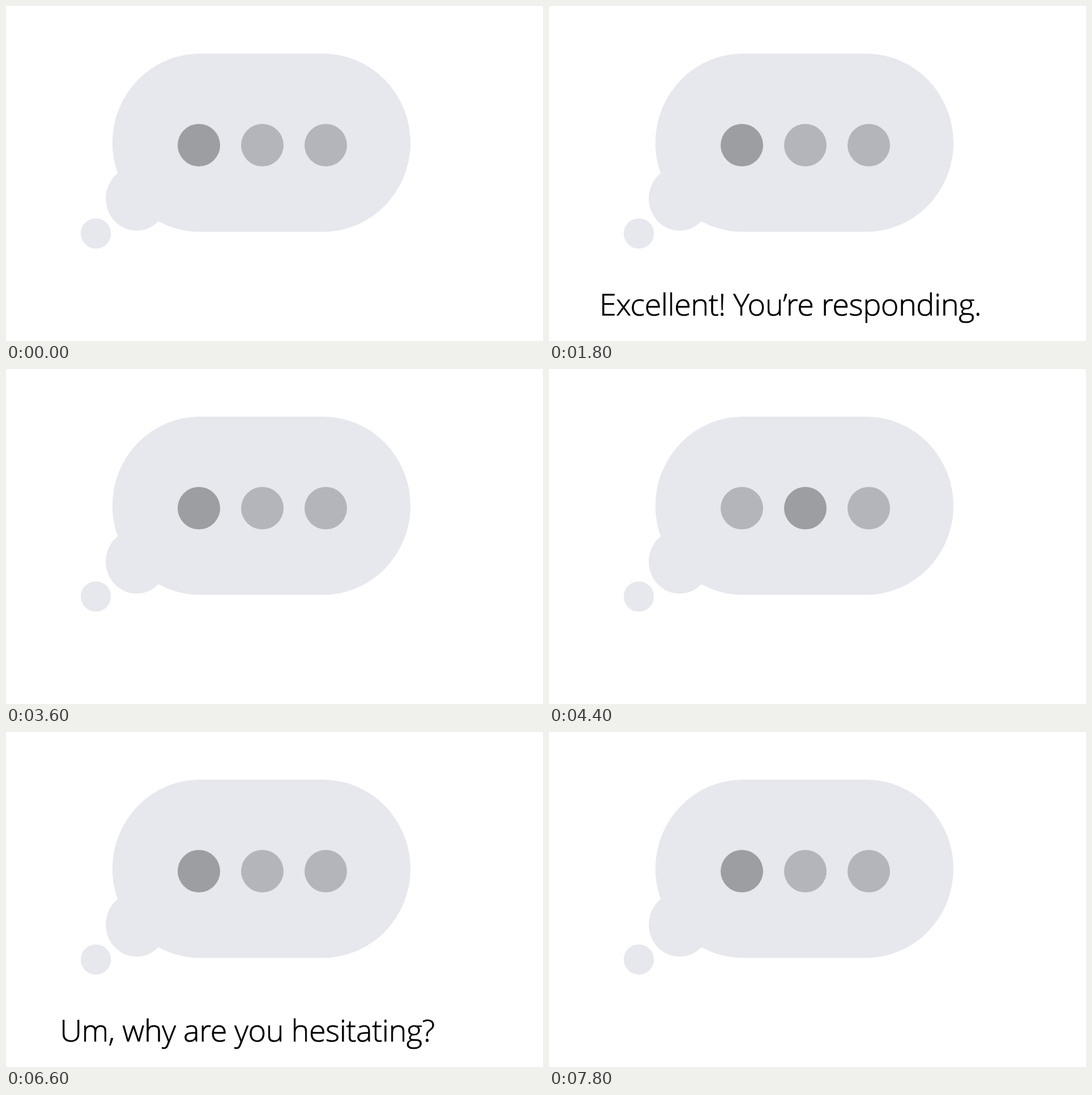
An HTML page that plays this animation: 948x591 px, repeating every 8000 ms.

```html
<!DOCTYPE html>
<html lang="en">
<head>
<meta charset="utf-8">
<title>Typing bubble</title>
<style>
  html, body { margin: 0; width: 100%; height: 100%; overflow: hidden; background: #fff; }
  svg { display: block; width: 100%; height: 100%; }
  text {
    font: 300 54px "Open Sans", "Noto Sans", sans-serif;
    letter-spacing: -0.5px;
    text-anchor: middle;
    stroke: #000;
    stroke-width: 0.7px;
  }
</style>
</head>
<body>
<svg viewBox="0 0 948 591">
  <g fill="#e7e8ed">
    <rect x="187.8" y="84" width="526.2" height="314.5" rx="154.5" ry="157.25"/>
    <ellipse cx="230.5" cy="339.8" rx="54.4" ry="56.5"/>
    <circle cx="158.6" cy="401.4" r="26.7"/>
  </g>
  <g id="dots">
    <circle cx="340.5" cy="245.5" r="37.5"/>
    <circle cx="452.5" cy="245.5" r="37.5"/>
    <circle cx="564.5" cy="245.5" r="37.5"/>
  </g>
  <text id="caption" x="426" y="545.5"></text>
</svg>
<script>
  const LOOP = 8000, STEP = 200;
  const captions = [
    { from: 1800, to: 3600, text: "Excellent! You’re responding." },
    { from: 6000, to: 7800, text: "Um, why are you hesitating?" },
  ];
  const dots = [...document.querySelectorAll("#dots circle")];
  const caption = document.getElementById("caption");
  const start = performance.now();

  function draw(now) {
    const time = Math.max(0, now - start) % LOOP;
    const active = Math.floor(time / STEP) % dots.length;
    dots.forEach((dot, i) => dot.setAttribute("fill", i === active ? "#9d9ea2" : "#b4b5ba"));

    const current = captions.find(c => time >= c.from && time < c.to);
    caption.textContent = current ? current.text : "";
    requestAnimationFrame(draw);
  }
  draw(start);
</script>
</body>
</html>
```
